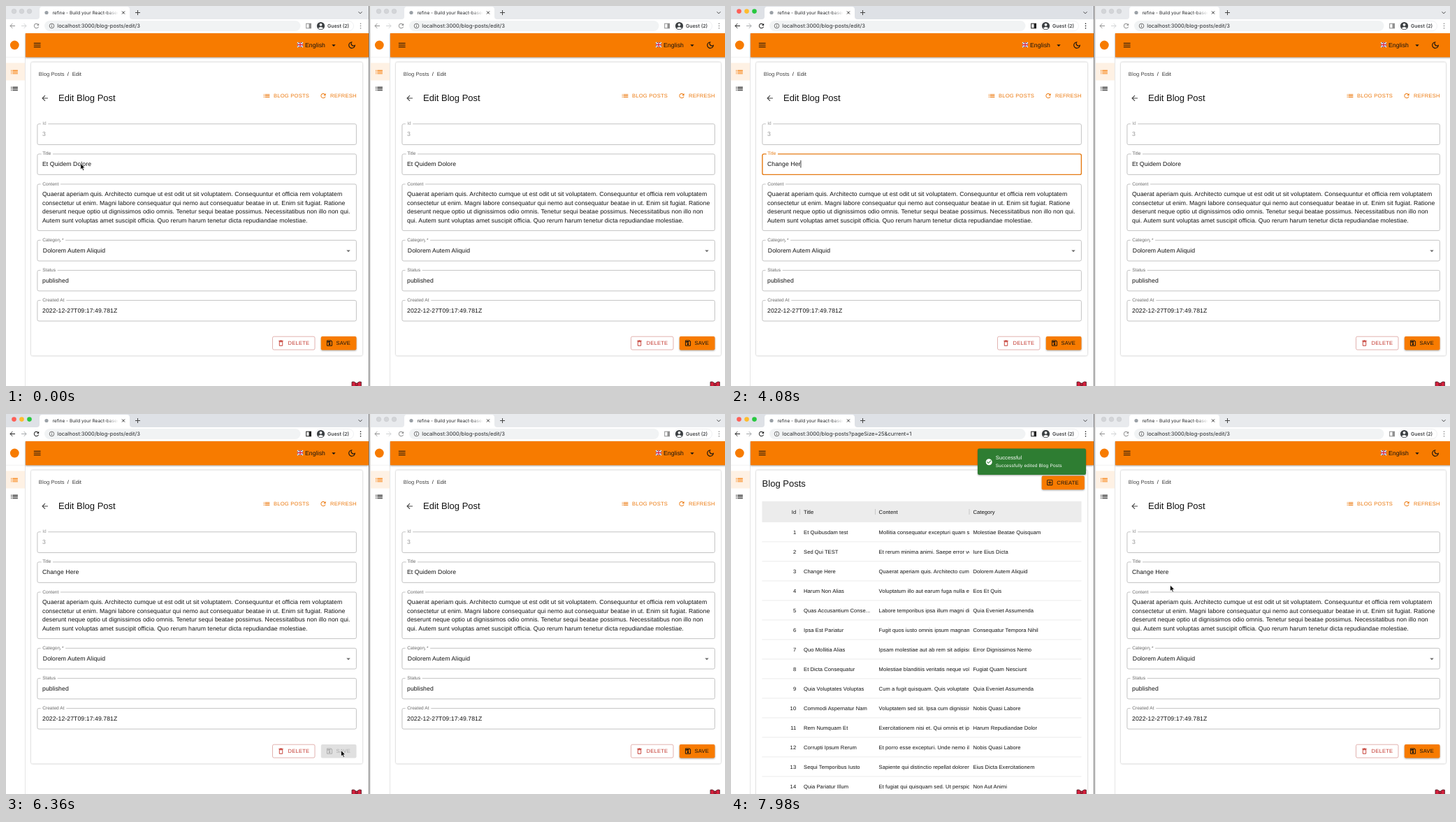
Write an HTML page that moves like this. It is 1029x544 px and loops after 8000 ms.

```html
<!DOCTYPE html>
<html lang="en">
<head>
<meta charset="utf-8">
<title>Live editing in two windows</title>
<style>
  html, body { margin: 0; width: 100%; height: 100%; overflow: hidden; background: #fff; }
  svg { display: block; width: 100vw; height: 100vh; }
  text { font-family: "Liberation Sans", Arial, sans-serif; letter-spacing: .0094em; fill: #111;
         text-rendering: geometricPrecision; white-space: pre; }
  .ui { font-family: Inter, sans-serif; letter-spacing: 0; fill: #26282b; }
  .btn { letter-spacing: .0286em; }
  .caption { letter-spacing: .0333em; }
  .label { fill: #666; stroke: #fff; stroke-width: 6px; stroke-linejoin: round; paint-order: stroke; }
  .box { fill: none; stroke: #bdbdbd; stroke-width: .9px; }
  .muted text { fill: #959595; }
  .paper { fill: #fff; filter: drop-shadow(0 .8px 1px rgba(0,0,0,.32)); }
  .raised { filter: drop-shadow(0 1px 1px rgba(0,0,0,.35)); }
  .focused .box { stroke: #e57a12; stroke-width: 1.4px; }
  .focused .label { fill: #e57a12; }
  .strip { fill: #e8eaed; }
  .active .strip { fill: #dee1e6; }
  .chrome { opacity: .5; }
  .active .chrome { opacity: 1; }
  .light { fill: #d3d5d8; stroke: #bfc1c4; stroke-width: .4px; }
  .active .light { fill: var(--on); stroke: none; }
  .save.hover rect { fill: #ab5600; }
  .save.disabled rect { fill: #e0e0e0; filter: none; }
  .save.disabled text, .save.disabled path { fill: #a9a9a9; }
</style>
</head>
<body>
<svg id="stage" viewBox="0 0 1029 544" preserveAspectRatio="none"></svg>
<script>
const ORANGE = '#f77b00', RED = '#c43a31', LOOP = 8000;
const ICONS = {
  list: 'M3 13h2v-2H3v2zm0 4h2v-2H3v2zm0-8h2V7H3v2zm4 4h14v-2H7v2zm0 4h14v-2H7v2zM7 7v2h14V7H7z',
  menu: 'M3 18h18v-2H3v2zm0-5h18v-2H3v2zm0-7v2h18V6H3z',
  back: 'M20 11H7.83l5.59-5.59L12 4l-8 8 8 8 1.41-1.41L7.83 13H20v-2z',
  drop: 'M7 10l5 5 5-5z',
  refresh: 'M17.65 6.35C16.2 4.9 14.21 4 12 4c-4.42 0-7.99 3.58-7.99 8s3.57 8 7.99 8c3.73 0 6.84-2.55 7.73-6h-2.08c-.82 2.33-3.04 4-5.65 4-3.31 0-6-2.69-6-6s2.69-6 6-6c1.66 0 3.14.69 4.22 1.78L13 11h7V4z',
  moon: 'M9.37 5.51a7.4 7.4 0 0 0 9.12 9.12A7 7 0 1 1 9.37 5.51zM12 3a9 9 0 1 0 8.9 7.64A5.4 5.4 0 1 1 13.36 3.1 9 9 0 0 0 12 3z',
  trash: 'M6 19c0 1.1.9 2 2 2h8c1.1 0 2-.9 2-2V7H6v12zM8 9h8v10H8V9zm7.5-5l-1-1h-5l-1 1H5v2h14V4z',
  save: 'M17 3H5c-1.11 0-2 .9-2 2v14c0 1.1.89 2 2 2h14c1.1 0 2-.9 2-2V7l-4-4zm2 16H5V5h11.17L19 7.83V19zm-7-7c-1.66 0-3 1.34-3 3s1.34 3 3 3 3-1.34 3-3-1.34-3-3-3zM6 6h9v4H6z',
  add: 'M19 3H5c-1.1 0-2 .9-2 2v14c0 1.1.9 2 2 2h14c1.1 0 2-.9 2-2V5c0-1.1-.9-2-2-2zm0 16H5V5h14v14zm-8-2h2v-4h4v-2h-4V7h-2v4H7v2h4z',
  check: 'M12 2a10 10 0 1 0 0 20 10 10 0 0 0 0-20zm-2 15l-5-5 1.41-1.41L10 14.17l7.59-7.59L19 8l-9 9z'
};

const text = (x, y, s, size = 8.67, attrs = '') => `<text x="${x}" y="${y}" font-size="${size}" ${attrs}>${s}</text>`;
const rect = (x, y, w, h, attrs = '') => `<rect x="${x}" y="${y}" width="${w}" height="${h}" ${attrs}/>`;
const circle = (x, y, r, attrs = '') => `<circle cx="${x}" cy="${y}" r="${r}" ${attrs}/>`;
const line = (d, color = '#333', width = 1) => `<path d="${d}" fill="none" stroke="${color}" stroke-width="${width}"/>`;
const icon = (name, cx, cy, size = 13, fill = '#111') =>
  `<path d="${ICONS[name]}" fill="${fill}" fill-rule="evenodd" transform="translate(${cx - size / 2} ${cy - size / 2}) scale(${size / 24})"/>`;
const button = (x, y, name, label, color, size = 10.8) =>
  icon(name, x, y, size, color) + text(x + 10, y + 2.8, label, 7.58, `class="btn" style="fill:${color}"`);

// r shifts everything anchored to the window's right side
function browser(r) {
  const lights = ['#ff5f57', '#febc2e', '#28c840']
    .map((c, i) => circle(11.5 + 11 * i, 7.6, 3.3, `class="light" style="--on:${c}"`)).join('');
  return rect(0, 0, 519, 19, 'class="strip"') + lights
    + '<path d="M44 19q4 0 4-4V5q0-4 4-4h121q4 0 4 4v10q0 4 4 4z" fill="#fff"/>'
    + circle(58, 9.5, 2.6, 'fill="#9aa0a6"')
    + text(66.5, 12, 'refine - Build your React-based', 6.5, 'class="ui" clip-path="url(#tabClip)"')
    + rect(143, 4, 18, 12, 'fill="url(#fade)"')
    + line('M166 7.5l4 4m0-4l-4 4') + line('M185 9.5h7m-3.5-3.5v7', '#444')
    + line(`M${504.5 + r} 8.3l2.5 2.5 2.5-2.5`, '#444')
    + rect(0, 19, 519, 20, 'fill="#fff"')
    + `<g class="chrome">${line('M13 28.5H6m3.3-3.4L6 28.5l3.3 3.4', '#222')}`
    + `${line('M22 28.5h7m-3.3-3.4l3.3 3.4-3.3 3.4', '#a5a8ab')}${icon('refresh', 43.5, 28.5, 11, '#222')}</g>`
    + rect(55, 21, 366.5 + r, 15, 'rx="7.5" fill="#f1f3f4"')
    + circle(65.5, 28.5, 3.3, 'fill="none" stroke="#555" stroke-width=".8"') + line('M65.5 28v2.3m0-4v1', '#555', .8)
    + text(73.3, 31.2, 'localhost:3000/blog-posts/edit/3', 7.58, 'class="ui url"')
    + `<g class="chrome" transform="translate(${r} 0)">${rect(429.7, 25.2, 6.8, 6.6, 'fill="none" stroke="#222"')}`
    + rect(433.5, 25, 3.2, 7, 'fill="#222"') + circle(507.5, 25.2, .8) + circle(507.5, 28.5, .8) + circle(507.5, 31.8, .8) + '</g>'
    + `<g transform="translate(${r} 0)">${rect(443, 21.5, 54.5, 14.2, 'rx="7.1" fill="#fff" stroke="#e4e6e9" stroke-width=".6"')}`
    + circle(450.5, 28.5, 5.6, 'fill="#3c4043"') + circle(450.5, 26.8, 1.9, 'fill="#fff"')
    + '<path d="M446.8 31.8q3.7-3.8 7.4 0-3.7 3-7.4 0z" fill="#fff"/>'
    + text(460, 31.1, 'Guest (2)', 7.04, 'class="ui" font-weight="500"') + '</g>';
}

function shell(r) {
  const flag = rect(417, 52, 8, 7, 'fill="#26366f"') + line('M417 52l8 7m0-7l-8 7', '#fff', 1.2)
    + line('M421 52v7m-4-3.5h8', '#fff', 2.4) + line('M421 52v7m-4-3.5h8', '#d3203a', 1.3);
  return rect(0, 39, 519, 505, 'fill="#fff"')
    + rect(27, 39, .7, 505, 'fill="#dcdcdc"') + line('M0 73.3h27.5', '#eee', .7)
    + rect(0, 81.5, 27, 25, 'fill="#fef1e4"')
    + circle(12.3, 56, 6.4, `fill="${ORANGE}"`)
    + icon('list', 12, 94.5, 13, ORANGE) + icon('list', 12, 118.5)
    + rect(28, 39, 491, 34.3, `class="raised" fill="${ORANGE}"`) + icon('menu', 44.7, 56)
    + `<g transform="translate(${r} 0)">${flag}${text(428, 58.6, 'English')}${icon('drop', 469, 56.3)}${icon('moon', 495, 56)}</g>`;
}

const bow = r => `<g transform="translate(${r} 0)"><path d="M495 538.2q3-1.5 6.7 2.3 3.7-3.8 6.7-2.3v7.8h-13.4z" fill="#d4213d" stroke="#40141c" stroke-width=".8"/>`
  + circle(501.7, 542, 1.7, 'fill="#d4213d" stroke="#40141c" stroke-width=".7"') + '</g>';

function field(r, y, h, label, lines, cls = '', x = 52) {
  const values = lines.map((s, i) => text(x, y + 17.2 + 12.46 * i, s, 8.67, 'class="value"')).join('');
  return `<g class="${cls}">${rect(44.9, y, 456.5 + r, h, 'class="box" rx="2.2"')}`
    + text(52.2, y + 1.5, label, 6.5, 'class="label"') + `<g class="under"></g>${values}</g>`;
}

function editPage(r, content) {
  return `<g class="edit">${rect(36, 80.5, 474 + r, 420, 'class="paper" rx="2"')}`
    + text(46.8, 99.8, 'Blog Posts', 7.58, 'style="fill:#444"') + text(87.8, 99.8, '/', 7.58) + text(94.7, 99.8, 'Edit', 7.58, 'style="fill:#333"')
    + icon('back', 55.6, 132, 13, '#444') + text(75, 136, 'Edit Blog Post', 13, 'style="letter-spacing:0"')
    + `<g transform="translate(${r} 0)">${button(373, 128.6, 'list', 'BLOG POSTS', '#ec7a10', 11.6)}${button(454, 128.6, 'refresh', 'REFRESH', '#ec7a10')}</g>`
    + field(r, 168.8, 29.7, 'Id', ['3'], 'muted')
    + field(r, 211.9, 29.5, 'Title', ['Et Quidem Dolore'], 'title')
    + field(r, 255, 66.6, 'Content', content)
    + field(r, 335.3, 29.7, 'Category<tspan dx="1">*</tspan>', ['Dolorem Autem Aliquid'], '', 52.8)
    + icon('drop', 490 + r, 350.6, 13, '#666')
    + field(r, 378.4, 29.5, 'Status', ['published'])
    + field(r, 421.4, 29.6, 'Created At', ['2022-12-27T09:17:49.781Z'])
    + `<g transform="translate(${r} 0)">${rect(381.5, 473.2, 60.5, 18.9, 'rx="2" fill="#fff" stroke="#dba09c" stroke-width=".8"')}`
    + button(393.5, 482.6, 'trash', 'DELETE', RED)
    + `<g class="save">${rect(450.8, 473, 50.7, 19.4, `rx="2" class="raised" fill="${ORANGE}"`)}`
    + icon('save', 463, 482.6, 10.8) + text(472.5, 485.4, 'SAVE', 7.58, 'class="btn"') + '</g></g></g>';
}

const ROWS = `Et Quibusdam test|Mollitia consequatur excepturi quam sit|Molestiae Beatae Quisquam
Sed Qui TEST|Et rerum minima animi. Saepe error vel|Iure Eius Dicta
Change Here|Quaerat aperiam quis. Architecto cumque|Dolorem Autem Aliquid
Harum Non Alias|Voluptatum illo aut earum fuga nulla et|Eos Et Quis
Quas Accusantium Conse...|Labore temporibus ipsa illum magni dicta|Quia Eveniet Assumenda
Ipsa Est Pariatur|Fugit quos iusto omnis ipsum magnam|Consequatur Tempora Nihil
Quo Mollitia Alias|Ipsam molestiae aut ab rem sit adipisci|Error Dignissimos Nemo
Et Dicta Consequatur|Molestiae blanditiis veritatis neque vol|Fugiat Quam Nesciunt
Quia Voluptates Voluptas|Cum a fugit quisquam. Quis voluptates|Quia Eveniet Assumenda
Commodi Aspernatur Nam|Voluptatem sed sit. Ipsa cum dignissim|Nobis Quasi Labore
Rem Numquam Et|Exercitationem nisi et. Qui omnis et ipsa|Harum Repudiandae Dolor
Corrupti Ipsum Rerum|Et porro esse excepturi. Unde nemo illo|Nobis Quasi Labore
Sequi Temporibus Iusto|Sapiente qui distinctio repellat dolorem|Eius Dicta Exercitationem
Quia Pariatur Illum|Et fugiat qui quisquam sed. Ut perspici|Non Aut Animi`;

function listPage() {
  const cells = (y, id, title, content, category) =>
    text(93.2, y, id, 7.58, 'text-anchor="end"') + text(104, y, title, 7.58)
    + text(211.6, y, content, 7.58, 'clip-path="url(#cellClip)"') + text(346.4, y, category, 7.58);
  const rows = ROWS.split('\n').map((row, i) =>
    cells(172.2 + 28 * i, i + 1, ...row.split('|')) + line(`M44.5 ${182.9 + 28 * i}h457`, '#e4e4e4', .7)).join('');
  return `<g class="list">${rect(36, 80.5, 474, 480, 'class="paper" rx="2"')}`
    + text(44.6, 103.6, 'Blog Posts', 13, 'style="letter-spacing:0"')
    + rect(444.7, 88.5, 61.2, 19.8, `rx="2" class="raised" fill="${ORANGE}"`) + button(456.3, 98.2, 'add', 'CREATE', '#111')
    + rect(44.5, 125, 457, 29.9, 'fill="#ececec"') + cells(143, 'Id', 'Title', 'Content', 'Category')
    + line('M98.5 136v8m108-8v8m134.5-8v8', '#c4c4c4', .9) + rows + '</g>';
}

const toast = `<g class="toast">${rect(353, 49.6, 155, 37.4, 'rx="2.2" class="raised" fill="#2e7d32"')}`
  + icon('check', 369.2, 68.7, 10.8, '#fff') + text(378.8, 65.3, 'Successful', 7.58, 'style="fill:#fff"')
  + text(378.8, 75.9, 'Successfully edited Blog Posts', 6.5, 'class="caption" style="fill:#fff"') + '</g>';

const BODY = {
  left: ['Quaerat aperiam quis. Architecto cumque ut est odit ut sit voluptatem. Consequuntur et officia rem voluptatem',
    'consectetur ut enim. Magni labore consequatur qui nemo aut consequatur beatae in ut. Enim sit fugiat. Ratione',
    'deserunt neque optio ut dignissimos odio omnis. Tenetur sequi beatae possimus. Necessitatibus non illo non qui.',
    'Autem sunt voluptas amet suscipit officia. Quo rerum harum tenetur dicta repudiandae molestiae.']
};
BODY.right = [...BODY.left.slice(0, 2), BODY.left[2].replace(' qui.', ''), 'qui. ' + BODY.left[3]];

const stage = document.getElementById('stage');
stage.innerHTML = `<defs>
  <linearGradient id="fade"><stop stop-color="#fff" stop-opacity="0"/><stop offset="1" stop-color="#fff"/></linearGradient>
  <clipPath id="tabClip">${rect(60, 0, 100, 19)}</clipPath>
  <clipPath id="cellClip">${rect(205, 120, 136, 424)}</clipPath>
  <clipPath id="winClip">${rect(0, 0, 519, 544)}</clipPath></defs>
  <g id="right" transform="translate(522 0)">${browser(-9)}${shell(-9)}${editPage(-9, BODY.right)}${bow(-9)}</g>
  <g id="left" clip-path="url(#winClip)">${browser(0)}${shell(0)}${editPage(0, BODY.left)}${listPage()}${toast}${bow(0)}</g>
  ${rect(519, 0, 1.3, 544, 'fill="#777"')}${rect(520.3, 0, 1.7, 544, 'fill="#d9d9d9"')}
  <g id="cursor">
    <path class="arrow" d="M0 0v8.6l2-1.8 1.4 3.2 1.5-.7-1.4-3.1h2.7z" stroke="#fff" stroke-width=".7"/>
    <path class="beam" d="M-1.8-4.5q1.8 0 1.8 1v7q0 1-1.8 1m3.6-9q-1.8 0-1.8 1m0 7q0 1 1.8 1" fill="none" stroke="#111" stroke-width=".9"/>
    <path class="hand" d="M0 .5q1-1 1.6.2l.3 3.2 2.8.7q.8.5.5 1.7l-.8 3.2H.8L-2 6q-.2-1.3 1-.9l.9.7z" fill="#fff" stroke="#111" stroke-width=".7"/>
  </g>`;

const $ = s => stage.querySelector(s);
const show = (el, on) => { el.style.display = on ? '' : 'none'; };
const el = {
  left: $('#left'), url: $('#left .url'), edit: $('#left .edit'), list: $('.list'), toast: $('.toast'),
  title: $('#left .title'), value: $('#left .title .value'), save: $('#left .save'),
  remote: $('#right .title .value'), cursor: $('#cursor'),
  arrow: $('.arrow'), beam: $('.beam'), hand: $('.hand')
};
$('#left .title .under').innerHTML =
  `<g class="selection">${rect(52, 220.2, 71, 12, 'fill="#b2d5f3"')}${line('M63 231.3h30', '#d9604a', .9)}</g>${rect(0, 221, .8, 10.5, 'class="caret"')}`;
el.selection = $('.selection');
el.caret = $('.caret');

const OLD = 'Et Quidem Dolore', NEW = 'Change Here';
const KEYS = [2220, 2340, 2460, 2580, 2700, 2940, 3240, 3480, 3780, 4020, 4500];
const FOCUS = 600, SELECT = 1560, HOVER = 5120, CLICK = 5700, DONE = 6540, LIST = 7560;
const PATH = [[0, 106.8, 225.5], [4620, 106.8, 225.5], [5220, 479.5, 481.5], [6660, 479.5, 481.5],
  [7380, 627, 337.5], [7980, 628.5, 245], [LOOP, 628.5, 245]];

const clamp = v => Math.min(1, Math.max(0, v));
const ease = v => v * v * (3 - 2 * v);

function pointer(t) {
  const i = Math.max(1, PATH.findIndex(p => p[0] > t));
  const [t0, x0, y0] = PATH[i - 1], [t1, x1, y1] = PATH[i];
  const k = ease(clamp((t - t0) / (t1 - t0)));
  return [x0 + (x1 - x0) * k, y0 + (y1 - y0) * k];
}

function render(t) {
  const typed = KEYS.filter(k => k <= t).length;
  const focused = t >= FOCUS && t < CLICK;
  const selected = t >= SELECT && !typed;
  const done = t >= DONE;

  el.left.classList.toggle('active', t >= FOCUS);
  el.title.classList.toggle('focused', focused);
  el.value.textContent = typed ? NEW.slice(0, typed) : OLD;
  show(el.selection, selected);
  const blinkFrom = typed ? KEYS[typed - 1] : FOCUS;
  show(el.caret, focused && !selected && (t - blinkFrom) % 1000 < 500);
  el.caret.setAttribute('x', 52 + el.value.getComputedTextLength());

  el.save.classList.toggle('hover', t >= HOVER && t < CLICK + 80);
  el.save.classList.toggle('disabled', t >= CLICK + 80);

  el.url.textContent = 'localhost:3000/blog-posts' + (done ? '?pageSize=25&current=1' : '/edit/3');
  show(el.edit, !done);
  show(el.list, t >= LIST);
  show(el.toast, done);
  el.toast.setAttribute('transform', `translate(${170 * (1 - clamp((t - DONE) / 225)) ** 3} 0)`);
  el.remote.textContent = t >= DONE + 60 ? NEW : OLD;

  show(el.cursor, t < SELECT || t >= 4620);
  el.cursor.setAttribute('transform', `translate(${pointer(t).join(' ')})`);
  const beam = t >= FOCUS && t < SELECT, hand = t >= HOVER && t < CLICK + 80;
  show(el.beam, beam);
  show(el.hand, hand);
  show(el.arrow, !beam && !hand);
}

const start = performance.now();
function tick() {
  render((performance.now() - start) % LOOP);
  requestAnimationFrame(tick);
}
tick();
</script>
</body>
</html>
```
